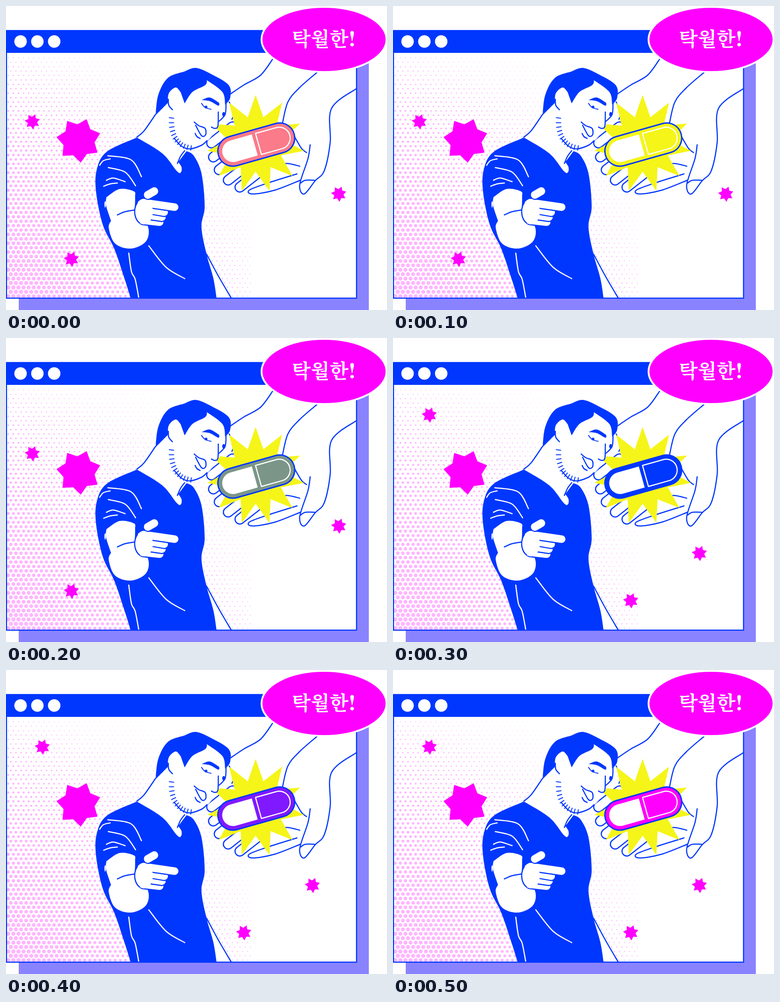
An HTML page with a canvas for the animation above (0.6 s loop, 838x668 px).

```html
<!DOCTYPE html>
<html lang="ko">
<head>
<meta charset="utf-8">
<style>
html, body { margin: 0; width: 100%; height: 100%; overflow: hidden; background: #fff; }
canvas { display: block; width: 838px; height: 668px; }
</style>
</head>
<body>
<canvas id="stage" width="838" height="668"></canvas>
<script>
const ctx = document.getElementById('stage').getContext('2d');
const BLUE = '#0037ff', PINK = '#ff00ff', YELLOW = '#f5f51a', WHITE = '#fff';
const STEP = 100, LINE = 2.5;
const pillColors = ['#fb7b8a', YELLOW, '#7b9688', BLUE, '#8019ff', PINK];
const starSets = [
  [[58, 254], [144, 556], [732, 413]],
  [[80, 169], [674, 473], [523, 577]]
];

// Smooth curve through "x y x y"; "/" marks a sharp corner at the last point.
function curve(text) {
  const path = new Path2D();
  let last = null;
  for (const piece of text.split('/')) {
    const n = piece.trim().split(/\s+/).map(Number);
    const p = last ? [last] : [];
    for (let i = 0; i < n.length; i += 2) p.push([n[i], n[i + 1]]);
    if (!last) path.moveTo(...p[0]);
    for (let i = 0; i < p.length - 1; i++) {
      const a = p[i - 1] || p[i], b = p[i], c = p[i + 1], d = p[i + 2] || c;
      path.bezierCurveTo(
        b[0] + (c[0] - a[0]) / 6, b[1] + (c[1] - a[1]) / 6,
        c[0] - (d[0] - b[0]) / 6, c[1] - (d[1] - b[1]) / 6, c[0], c[1]);
    }
    last = p[p.length - 1];
  }
  return path;
}

const toPath = shape => typeof shape === 'string' ? curve(shape) : shape;

function fill(shape, color) {
  ctx.fillStyle = color;
  ctx.fill(toPath(shape));
}

function line(shape, color = BLUE, width = LINE) {
  ctx.strokeStyle = color;
  ctx.lineWidth = width;
  ctx.stroke(toPath(shape));
}

// Outlined white capsule between two points.
function finger(x0, y0, x1, y1, width) {
  const path = new Path2D();
  path.moveTo(x0, y0);
  path.lineTo(x1, y1);
  line(path, BLUE, width + LINE);
  line(path, WHITE, width - LINE);
}

function ellipse(x, y, rx, ry = rx, from = 0, to = 2 * Math.PI) {
  const path = new Path2D();
  path.ellipse(x, y, rx, ry, 0, from, to);
  return path;
}

function star(x, y, outer, inner, tips, start, color) {
  const path = new Path2D();
  for (let i = 0; i < tips * 2; i++) {
    const a = start + i * Math.PI / tips, r = i % 2 ? inner : outer;
    path.lineTo(x + r * Math.cos(a), y + r * Math.sin(a));
  }
  path.closePath();
  fill(path, color);
}

const pinkStar = (x, y, r, ratio) => star(x, y, r, r * ratio, 7, -1.21, PINK);

function halftone() {
  const gap = 11.2, rowGap = 9.7;
  for (let row = 0; row < 55; row++) {
    const v = row / 54;
    for (let x = 5 + row % 2 * gap / 2; x < 538; x += gap) {
      const u = x / 538;
      const r = 1.1 + 3.8 * v ** 0.85 * (1 - u) - 1.2 * u * (1 - v);
      if (r > 0.2) fill(ellipse(x, 114 + row * rowGap, r), '#ffb5ff');
    }
  }
}

function hand() {
  fill('587 116 524 173 485 200 / 480 300 530 390 / 647 382 / 700 362 712 240 770 182 / 770 116', WHITE);
  line('587 116 560 152 524 173 494 193');
  line('491 211 500 236 497 249');
  line('684 146 645 180 620 211 608 258');

  // fingertips fan out around the pill
  for (let i = 4; i >= 0; i--) {
    const a = (181 - 17.5 * i) * Math.PI / 180;
    const x = 549 + 97 * Math.cos(a), y = 303 + 102 * Math.sin(a);
    finger(x, y, x + 46, y - 36, 21);
  }
  const little = curve('647 383 590 405 542 413 536 404 582 387 640 369');
  fill(little, WHITE);
  line(little);
  line('598 357 616 346 646 352');

  // thumb and wrist
  line('770 182 716 225 713 300 700 362 680 384 656 413 646 393 664 336 669 305');
  line('648 389 658 383 679 383');
  line('634 286 650 313 661 322');
  star(549, 303, 107.5, 61, 11, -Math.PI / 2, YELLOW);
}

function pill(color) {
  const box = (x, r, w, corners) => {
    const path = new Path2D();
    path.roundRect(x, -r, w, 2 * r, corners);
    return path;
  };
  ctx.save();
  ctx.translate(550.5, 304.5);
  ctx.rotate(-0.274);
  const body = box(-86.5, 33, 173, 33);
  fill(body, color);
  line(body, BLUE, 3);
  fill(box(-77, 24, 73.5, [24, 0, 0, 24]), WHITE);
  line(box(5, 24, 71.5, [0, 24, 24, 0]), WHITE);
  ctx.restore();
}

function stubble() {
  const bezier = (t, a, b, c) => (1 - t) ** 2 * a + 2 * t * (1 - t) * b + t * t * c;
  for (let i = 0; i < 12; i++) {
    const t = i / 11;
    const x = bezier(t, 364, 362, 407), y = bezier(t, 246, 306, 312);
    const a = Math.PI / 2 * (t - 0.08);
    const dx = 5 * Math.cos(a), dy = -5 * Math.sin(a);
    line(`${x - dx} ${y - dy} ${x + dx} ${y + dy}`, BLUE, 2);
  }
}

function head() {
  const nape = '329 238 304 274 288 288', profile = '484 213 482 238 469 253';
  const jaw = '370 291 386 308 404 314 430 306 442 296';
  fill(nape + ' / 385 368 / 397 319 / 404 314 430 306 452 287 458 270 / 467 265 482 238' +
    ' / 484 215 440 155 340 200', WHITE);
  line(nape);
  line(jaw);
  line(profile);
  line('357 205 358 218 366 228');
  line('467 233 466 264 459 269 452 266');
  line('393 318 384 330 377 346');
  stubble();

  // hair
  fill('329 240 335 195 356 158 392 144 / 418 136 452 150 490 174 493 202 482 217' +
    ' / 476 189 442 163 / 438 174 410 189 393 214 / 384 189 / 373 179 358 192 356 213 / 329 240', BLUE);

  // brow, eyes and mouth
  fill('430 207 448 201 469 213 / 467 219 448 209 430 207', BLUE);
  line('430 214 438 223 451 227', BLUE, 2);
  fill(ellipse(440, 222, 3), BLUE);
  fill(ellipse(479, 238, 3.5, 5), BLUE);
  line('414 255 424 263 438 269 439 283 430 285 417 262');
  line('416 280 420 287 427 291');
}

function torso() {
  const back = '441 545 468 595 495 641';
  fill(back + ' / 462 641', WHITE);
  line(back);
  fill('288 289 222 320 200 358 198 408 213 481 238 533 259 594 274 641' +
    ' / 463 641 / 456 598 441 545 430 486 437 440 430 368 413 329 397 319' +
    ' / 379 343 / 386 354 385 365 376 363 344 324 288 289', BLUE);

  // creases
  for (const crease of ['224 329 275 338 298 375', '206 350 214 340 229 336', '225 355 262 365 285 395',
    '221 383 236 378 262 386', '215 396 229 391 245 389', '314 527 352 574 393 599',
    '270 543 276 584 284 600 292 641']) line(crease, WHITE);
}

function arm() {
  fill('221 420 250 402 281 407 284 420 283 450 / 312 484 308 517 275 533 240 522 226 488 231 472' +
    ' / 220 438 221 420', WHITE);
  fill(ellipse(218, 436, 1.5, 7), WHITE);
  line('245 459 262 452 284 448');

  // pointing fist
  for (let i = 3; i >= 0; i--) {
    finger(302, 432 + 13 * i, i ? 353 - 5 * i : 371, 442 + 11 * i, 19);
  }
  finger(312, 415, 326, 407, 20);
  fill(ellipse(303, 452, 20, 28), WHITE);
  line(ellipse(303, 452, 20, 28, Math.PI * 0.65, Math.PI * 1.25));
}

function bubble() {
  const oval = ellipse(699.5, 73.5, 137.5, 71.5);
  fill(oval, PINK);
  line(oval, WHITE, 4);
  ctx.fillStyle = WHITE;
  ctx.font = '900 43px "Noto Serif CJK KR", "Noto Sans CJK KR", "Noto Sans CJK", serif';
  ctx.textAlign = 'center';
  ctx.fillText('탁월한!', 699, 88);
}

function draw(step) {
  ctx.lineCap = ctx.lineJoin = 'round';
  ctx.fillStyle = WHITE;
  ctx.fillRect(0, 0, 838, 668);
  ctx.fillStyle = '#8a83ff';
  ctx.fillRect(28, 80, 770, 588);
  ctx.fillStyle = WHITE;
  ctx.fillRect(0, 53, 771, 590);

  ctx.save();
  ctx.beginPath();
  ctx.rect(2, 103, 768, 539);
  ctx.clip();
  halftone();
  pinkStar(160, 295, 49.5, 0.71);
  hand();
  pill(pillColors[step]);
  head();
  torso();
  arm();
  for (const [x, y] of starSets[step < 3 ? 0 : 1]) pinkStar(x, y, 17.2, 0.61);
  ctx.restore();

  ctx.fillStyle = BLUE;
  ctx.fillRect(0, 53, 772, 50);
  ctx.strokeStyle = BLUE;
  ctx.lineWidth = LINE;
  ctx.strokeRect(1, 54, 770, 588);
  for (let i = 0; i < 3; i++) fill(ellipse(32 + 37 * i, 78, 13.7), WHITE);
  bubble();
}

let shown = -1;
function tick() {
  const step = Math.floor(performance.now() / STEP) % pillColors.length;
  if (step !== shown) draw(shown = step);
  requestAnimationFrame(tick);
}
tick();
</script>
</body>
</html>
```
